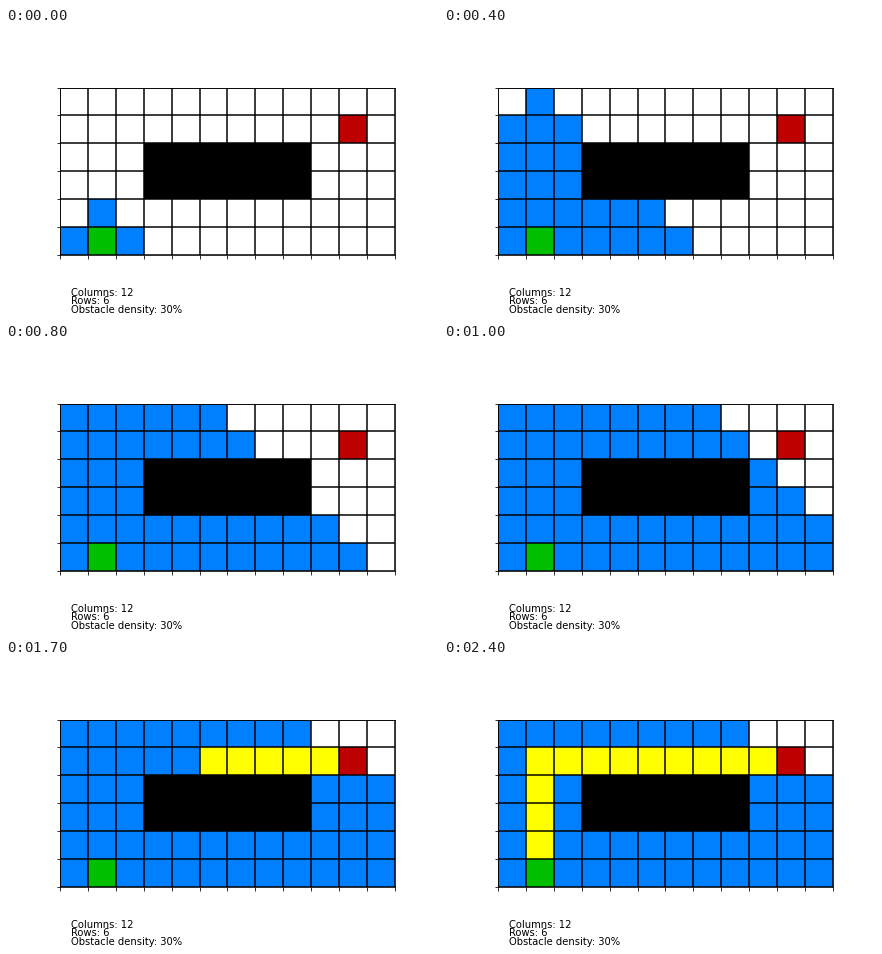
Animation of 432x288 px, one loop 2500 ms. Source, as a matplotlib script:

```python
import matplotlib.pyplot as plt
import numpy as np
from matplotlib.animation import FuncAnimation

COLS, ROWS = 12, 6
START, GOAL = (1, 0), (10, 4)
WALL = {(x, y) for x in range(3, 9) for y in (2, 3)}
STEPS = [(1, 0), (0, 1), (-1, 0), (0, -1)]

BLUE, YELLOW = (0, 0.5, 1), (1, 1, 0)
GREEN, RED = (0, 0.75, 0), (0.75, 0, 0)


def flood():
    """Breadth-first distances from START until GOAL is reached."""
    dist, queue = {START: 0}, [START]
    for x, y in queue:
        for dx, dy in STEPS:
            cell = x + dx, y + dy
            inside = 0 <= cell[0] < COLS and 0 <= cell[1] < ROWS
            if not inside or cell in WALL or cell in dist:
                continue
            dist[cell] = dist[x, y] + 1
            if cell == GOAL:
                return dist
            queue.append(cell)
    return dist


def trace(dist):
    """Walk back from GOAL, going left while that is shorter, else down."""
    path, (x, y) = [], GOAL
    while True:
        here = dist[x, y]
        if dist.get((x - 1, y), here) < here:
            x -= 1
        else:
            y -= 1
        if (x, y) == START:
            return path
        path.append((x, y))


dist = flood()
path = trace(dist)
reach = dist[GOAL]


def board(i):
    grid = np.ones((ROWS, COLS, 3))

    def paint(cells, color):
        for x, y in cells:
            grid[y, x] = color

    paint(WALL, (0, 0, 0))
    paint([c for c, d in dist.items() if d <= i + 1], BLUE)
    paint(path[:max(0, i + 1 - reach)], YELLOW)
    paint([START], GREEN)
    paint([GOAL], RED)
    return grid


plt.rcParams["font.family"] = "DejaVu Sans"
fig = plt.figure(figsize=(6, 4), dpi=72, facecolor="white")
fig.subplots_adjust(left=0.125, right=0.9, bottom=0.125, top=0.88)
ax = fig.add_subplot()
image = ax.imshow(board(0), origin="lower", interpolation="nearest",
                  extent=(0, COLS, 0, ROWS))
ax.set_xticks(range(COLS + 1), [""] * (COLS + 1))
ax.set_yticks(range(ROWS + 1), [""] * (ROWS + 1))
ax.set_axisbelow(False)
ax.grid(color="black", linestyle="-", linewidth=1.5)

labels = [f"Columns: {COLS}", f"Rows: {ROWS}", "Obstacle density: 30%"]
for y, label in zip((0.07, 0.04, 0.01), labels):
    fig.text(0.15, y, label, fontsize=10)


def update(i):
    image.set_data(board(i))
    return [image]


anim = FuncAnimation(fig, update, frames=reach + len(path), interval=100,
                     repeat=True, repeat_delay=0)
plt.show()
```
